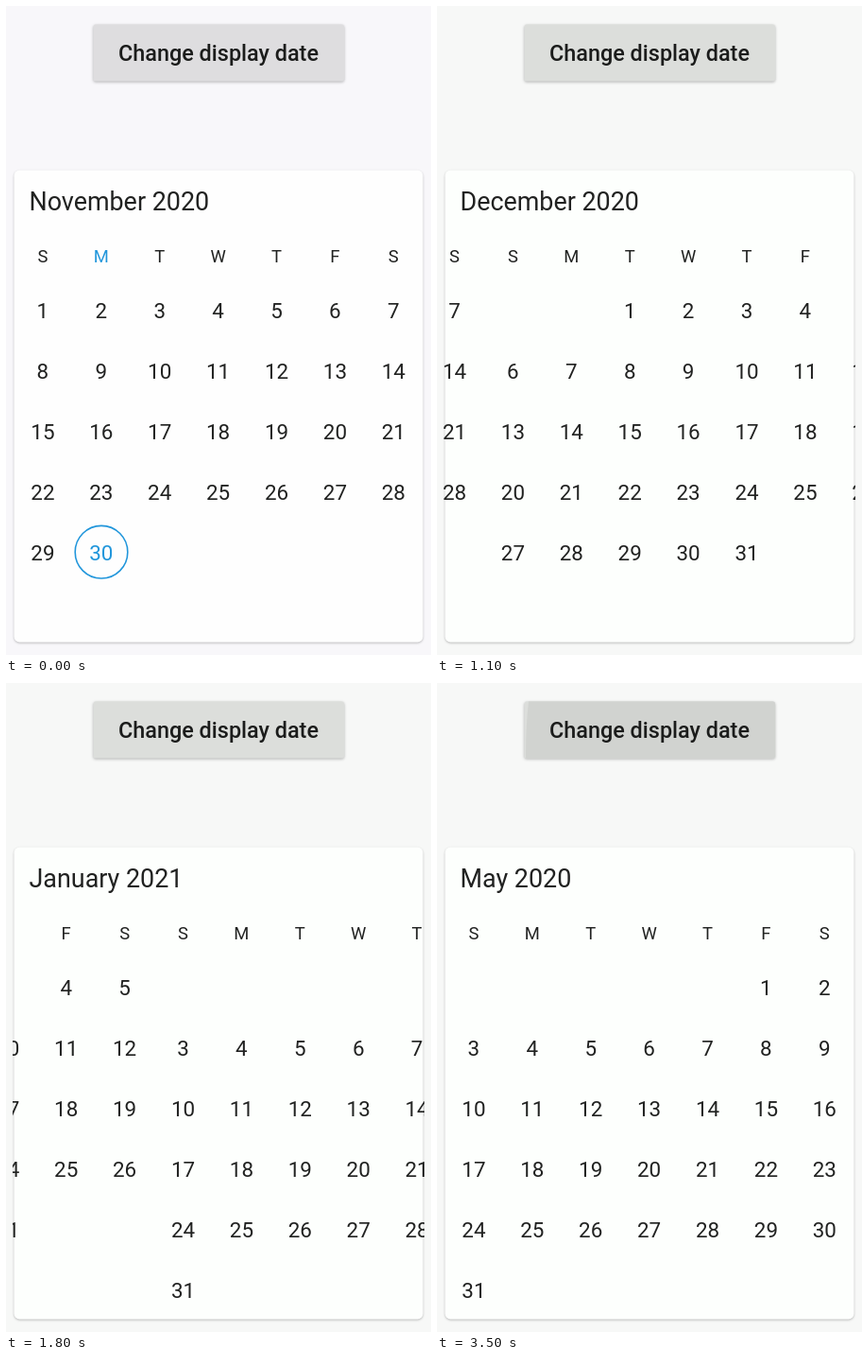
An HTML page for the animation above (4.7 s loop, 450 by 686 pixels).

```html
<!DOCTYPE html>
<html lang="en">
<head>
<meta charset="utf-8">
<title>Change display date</title>
<style>
html, body { margin: 0; width: 100%; height: 100%; overflow: hidden; }
body { background: #f7f8f7; animation: tint 4.7s step-end infinite; }
svg { display: block; width: 450px; height: 686px; font-family: Roboto, sans-serif; fill: #212221; }

.card { fill: #fdfffd; filter: drop-shadow(0 1.5px 1.3px rgba(0,0,0,.25)); animation: card 4.7s step-end infinite; }
.btn { fill: #dcdedb; filter: drop-shadow(0 1.5px 1.5px rgba(0,0,0,.28)); animation: btn 4.7s step-end infinite; }
.press { fill: #d1d3d0; opacity: 0; animation: may 4.7s step-end infinite; }
.label { font-size: 23.4px; font-weight: 500; text-anchor: middle; fill: #1b1c1b; }
.title { font-size: 26.9px; opacity: 0; }
.nov { animation: nov 4.7s step-end infinite; }
.dec { animation: dec 4.7s step-end infinite; }
.jan { animation: jan 4.7s step-end infinite; }
.may { animation: may 4.7s step-end infinite; }
#strip { animation: swipe 4.7s step-end infinite; text-anchor: middle; }
.week { font-size: 18.4px; }
.day { font-size: 22.4px; }
.now { fill: #2196db; }
.ring { fill: none; stroke: #2196db; stroke-width: 1.6; }

@keyframes tint { 0% { background: #f8f7fa; } 2.127%, 100% { background: #f7f8f7; } }
@keyframes card { 0% { fill: #fefefe; } 2.127%, 100% { fill: #fdfffd; } }
@keyframes btn { 0% { fill: #dedddf; } 2.127%, 100% { fill: #dcdedb; } }
@keyframes nov { 0% { opacity: 1; } 21.276%, 100% { opacity: 0; } }
@keyframes dec { 0% { opacity: 0; } 21.276% { opacity: 1; } 38.297%, 100% { opacity: 0; } }
@keyframes jan { 0% { opacity: 0; } 38.297% { opacity: 1; } 74.468%, 100% { opacity: 0; } }
@keyframes may { 0% { opacity: 0; } 74.468%, 100% { opacity: 1; } }
/* two swipes, each one page (433.3px) wide */
@keyframes swipe {
  0% { transform: translateX(0); }
  21.276% { transform: translateX(-270px); }
  23.404% { transform: translateX(-391.8px); }
  25.531% { transform: translateX(-428px); }
  27.659% { transform: translateX(-433.3px); }
  36.17% { transform: translateX(-461.8px); }
  38.297% { transform: translateX(-718px); }
  40.425% { transform: translateX(-826.8px); }
  42.553% { transform: translateX(-861.5px); }
  44.68%, 100% { transform: translateX(-866.6px); }
}
</style>
</head>
<body>
<svg viewBox="0 0 450 686">
  <defs><clipPath id="view"><rect x="7" y="174" width="436" height="498"/></clipPath></defs>
  <rect class="btn" x="92.5" y="19.5" width="265.5" height="60" rx="2.5"/>
  <path class="press" d="M97 19.5H355.5Q358 19.5 358 22V77Q358 79.5 355.5 79.5H94Q94 45 97 19.5Z"/>
  <text class="label" x="225" y="58">Change display date</text>
  <rect class="card" x="8.5" y="173.5" width="433" height="499" rx="6"/>
  <g class="titles">
    <text class="title nov" x="24.5" y="216">November 2020</text>
    <text class="title dec" x="24.5" y="216">December 2020</text>
    <text class="title jan" x="24.5" y="216">January 2021</text>
    <text class="title may" x="24.5" y="216">May 2020</text>
  </g>
  <g clip-path="url(#view)"><g id="strip"></g></g>
</svg>
<script>
const NS = 'http://www.w3.org/2000/svg';
const strip = document.getElementById('strip');
const CELL = 61.9, ROW = 64, PAGE = 433.3;

function add(tag, attrs, text = '') {
  const el = document.createElementNS(NS, tag);
  for (const key in attrs) el.setAttribute(key, attrs[key]);
  el.textContent = text;
  strip.append(el);
}

function month(page, first, count, today) {
  const colX = col => 38.9 + page * PAGE + col * CELL;
  [...'SMTWTFS'].forEach((name, col) => {
    const now = today && (first + today - 1) % 7 === col;
    add('text', { class: now ? 'week now' : 'week', x: colX(col), y: 271 }, name);
  });
  for (let day = 1; day <= count; day++) {
    const cell = first + day - 1;
    const x = colX(cell % 7), y = 322 + Math.floor(cell / 7) * ROW;
    const now = day === today;
    if (now) add('circle', { class: 'ring', cx: x + .2, cy: y - .8 , r: 27.8 });
    add('text', { class: now ? 'day now' : 'day', x, y: y + 7.9 }, day);
  }
}

month(0, 0, 30, 30);
month(1, 2, 31);
month(2, 5, 31);
</script>
</body>
</html>
```
